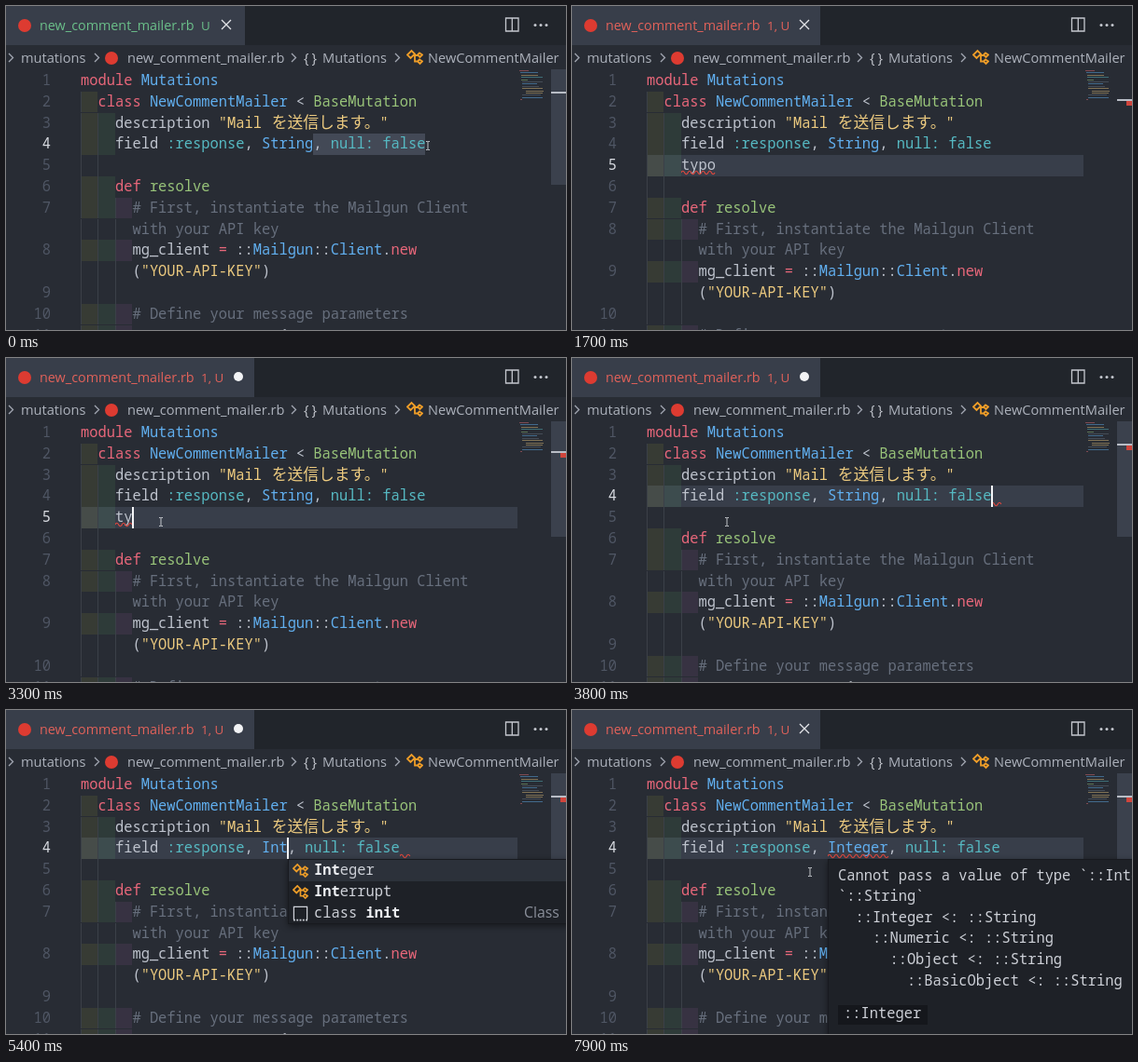
These frames come from a looping animation (600x348 px, 8 s). An HTML page:

```html
<!DOCTYPE html>
<html lang="en">
<head>
<meta charset="utf-8">
<title>Editor session</title>
<style>
  html, body { margin: 0; width: 100%; height: 100%; overflow: hidden; background: #282c34; }
  #stage { position: relative; width: 600px; height: 348px; overflow: hidden; background: #282c34; color: #bec3cd; }
  #stage div, #stage svg { position: absolute; }
  .ui { font: 14.6px/20px "Open Sans", sans-serif; white-space: pre; }
  .mono { font: 15.4px/22.8px "Noto Sans Mono", monospace; white-space: pre; font-variant-ligatures: none; }
  .bar { left: 0; top: 0; width: 600px; height: 42px; background: #21252b; }
  #tab { left: 0; top: 0; height: 42px; width: 256px; background: #383e4a; color: #6bc08a; font-size: 14.35px; }
  #tab.err { width: 266px; color: #e2625a; }
  #badge { left: 209px; top: 11px; font-size: 13.4px; }
  #close { left: 228px; top: 12px; }
  .err #close { left: 241px; }
  .gem { width: 14px; height: 14px; border-radius: 50%; background: #dd3b31; }
  .crumb { top: 45px; color: #adb2bc; }
  .no { left: 0; width: 48px; text-align: right; color: #4f5664; }
  .no.on { color: #d7dae0; }
  .r { color: #e8677a; } .b { color: #61afef; } .g { color: #98c379; }
  .y { color: #ecca7f; } .c { color: #56b9c2; } .m { color: #676f7d; }
  .j { color: #ecca7f; margin-left: 1.5px; font: 16.8px/0 "Noto Sans CJK JP", "Noto Sans CJK", sans-serif; }
  .w { font-weight: 700; color: #eceef2; }
  .pop { background: #1e2127; border: 1px solid #181a1f; box-sizing: border-box; box-shadow: 0 2px 7px #0007; overflow: hidden; color: #cdd0d7; }
  .line { fill: none; stroke: #c5c8cf; stroke-width: 1.3; }
</style>
</head>
<body>
<div id="stage">
  <svg width="0" height="0">
    <symbol id="class" viewBox="0 0 18 18"><path d="M1 6.500 5.500 2 9 5.500 4.500 10ZM7.500 7H12M9 7v6.500h3M12 6.500l2-2 3 2-2.500 2.500ZM12 13.500l2-2 3 2-2.500 2.500Z" fill="none" stroke="#ee9d28" stroke-width="1.8"/></symbol>
    <symbol id="cube" viewBox="0 0 18 18"><path d="M9 1.500 15.500 4.500V12.500L9 16.500 2.500 12.500V4.500ZM2.500 4.500 9 8l6.500-3.500M9 8v8.500" fill="none" stroke="#b094dc" stroke-width="1.5"/></symbol>
    <symbol id="snip" viewBox="0 0 18 18"><path d="M1.500 16V1.500H16.500V16" fill="none" stroke="#d0d3da" stroke-width="1.3"/><path d="M1 16.500H17" stroke="#d0d3da" stroke-width="2" stroke-dasharray="2 1.500"/></symbol>
  </svg>
  <div class="bar"></div>
  <div id="tab" class="ui">
    <div class="gem" style="left:13px;top:14px"></div>
    <div style="left:36px;top:11px">new_comment_mailer.rb</div>
    <div id="badge">U</div>
    <svg id="close" width="16" height="16"><path id="cross" d="M3 3 13 13M13 3 3 13" class="line" style="stroke:#e4e6ea"/><circle id="dot" cx="8" cy="8" r="5" fill="#f2f3f5"/></svg>
  </div>
  <svg width="60" height="42" style="left:530px;top:0"><path class="line" d="M5.500 13h13.500v14H5.500ZM12.300 13v14"/><g fill="#c5c8cf"><circle cx="37" cy="20.500" r="1.5"/><circle cx="43" cy="20.500" r="1.5"/><circle cx="49" cy="20.500" r="1.5"/></g></svg>
  <svg width="600" height="68" style="left:0;top:0"><path class="line" d="M3 51l4.500 4.500-4.500 4.500M95 51l4.500 4.500-4.500 4.500M306 51l4.500 4.500-4.500 4.500M417 51l4.500 4.500-4.500 4.500" style="stroke:#a3a8b3"/></svg>
  <div class="ui crumb" style="left:16px">mutations</div>
  <div class="gem" style="left:106px;top:49px"></div>
  <div class="ui crumb" style="left:130px">new_comment_mailer.rb</div>
  <div class="ui crumb" style="left:319px;letter-spacing:3px;color:#c5c8cf">{}</div>
  <div class="ui crumb" style="left:339px">Mutations</div>
  <svg width="18" height="18" style="left:429px;top:46px"><use href="#class"/></svg>
  <div class="ui crumb" style="left:452px">NewCommentMailer</div>
  <div id="code" class="mono"></div>
  <div id="map"></div>
  <div id="slider" style="left:584px;top:68px;width:16px;height:124px;background:#4e566680"></div>
  <div id="ruler"></div>
  <div id="caret" style="width:2px;height:22.8px;background:#f4f5f7"></div>
  <div id="popup" class="mono"></div>
  <svg id="mouse" width="8" height="12"><path d="M2 1.500H3.500L4 2 4.500 1.500H6M4 2V10M2 10.500H3.500L4 10 4.500 10.500H6" fill="none" stroke="#d4d7dc" stroke-width=".9"/></svg>
</div>
<script>
const $ = id => document.getElementById(id);
const LOOP = 8000, CW = 9.23, RH = 22.8, X0 = 80, Y0 = 68.9;
const colX = c => X0 + c * CW, rowY = r => Y0 + r * RH;

// {x:text} wraps text in a span of class x
const mark = s => s.replace(/&/g, '&amp;').replace(/</g, '&lt;')
  .replace(/\{(\w):(.*?)\}/g, '<span class="$1">$2</span>');
const div = (x, y, w, h, bg) =>
  `<div style="left:${x}px;top:${y}px;width:${w}px;height:${h}px;background:${bg}"></div>`;
const text = (x, y, s, cls = '') => `<div class="${cls}" style="left:${x}px;top:${y}px">${mark(s)}</div>`;
const icon = (x, y, id) => `<svg width="17" height="17" style="left:${x}px;top:${y}px"><use href="#${id}"/></svg>`;

const TINTS = ['#ffff4012', '#7fff7f12', '#ff7fff12'];

// [text, indent guides, is a wrapped continuation]
const docRows = s => [
  ['{r:module} {b:Mutations}', 0],
  ['  {r:class} {b:NewCommentMailer} < {g:BaseMutation}', 1],
  ['    description {y:"Mail }{j:を送信します。}{y:"}', 2],
  [`    field {c::response}, {b:${s.type}}, {c:null:} {c:false}`, 2],
  ...(s.line === null ? [] : [['    ' + s.line, 2]]),
  ['', 2],
  ['    {r:def} {g:resolve}', 2],
  ['      {m:# First, instantiate the Mailgun Client}', 3],
  ['      {m:with your API key}', 3, true],
  ['      mg_client {r:=} ::{b:Mailgun}::{b:Client}.{r:new}', 3],
  ['      ({y:"YOUR-API-KEY"})', 3, true],
  ['', 3],
  ['      {m:# Define your message parameters}', 3],
  ['      message_params {r:=} {', 3]
];

const TYPE_COL = 21;
const eol = s => TYPE_COL + s.type.length + 13;
const activeRow = s => s.line === null ? 3 : 4;

function squiggle(row, col, chars) {
  const n = Math.max(2, Math.round(chars * CW / 3.6));
  return `<svg width="90" height="6" style="left:${colX(col)}px;top:${rowY(row + 1) - 6.5}px">` +
    `<path d="M0 3q1.800 -3.500 3.600 0${'t3.600 0'.repeat(n - 1)}" fill="none" stroke="#e0483e" stroke-width="1.2"/></svg>`;
}

function codeHtml(s) {
  const active = activeRow(s);
  let html = s.sel ? div(colX(s.sel[0]), rowY(3), s.sel[1] * CW, RH, '#434956')
                   : div(X0, rowY(active), 468, RH, '#383e4a');
  let no = 0;
  docRows(s).forEach(([src, guides, wrapped], r) => {
    const y = rowY(r);
    const depth = wrapped ? 0 : src.match(/^ */)[0].length / 2;
    for (let i = 0; i < depth; i++) html += div(colX(2 * i), y, 2 * CW, RH, TINTS[i]);
    for (let i = 0; i < guides; i++) html += div(colX(2 * i), y, 1, RH, '#3b4048');
    if (!wrapped) html += text(0, y, String(++no), r === active ? 'no on' : 'no');
    html += text(X0, y, src);
  });
  if (s.squig === 'line') html += s.line === null ? squiggle(3, eol(s), 1) : squiggle(4, 4, s.line.length);
  if (s.squig === 'type') html += squiggle(3, TYPE_COL, s.type.length);
  return html;
}

// Overview ruler: cursor line and error mark
function rulerHtml(s) {
  const y = 92 + (activeRow(s) - 3) * 7.5;
  return div(584, y, 16, 2, '#b9bdc6') + (s.err ? div(594, y + 2, 6, 5, '#d0453c') : '');
}

const METHODS = [
  'try: (?un{w:typ}ed, *untyped) { (untyped) -> untyped',
  'try!: (?un{w:typ}ed, *untyped) { (untyped) -> untyped',
  'to_query: (un{w:typ}ed) -> ::String',
  'to_param: () -> un{w:typ}ed',
  'throw: (::Object, ?un{w:typ}ed) -> bot',
  'to_enum: (::Symbol, *un{w:typ}ed) ?{ (*untyped) -> untyped',
  'thread_cattr_reader: (*un{w:typ}ed, ?instance_reader: untyped'
].map(m => ['cube', 'def ' + m]);
const CLASSES = [['class', '{w:Int}eger'], ['class', '{w:Int}errupt'], ['snip', 'class {w:init}']];

const panel = (x, y, h, body) =>
  `<div class="pop" style="left:${x}px;top:${y}px;width:${610 - x}px;height:${h}px">${body}</div>`;
const list = (x, y, items) => panel(x, y, items.length * RH + 2,
  div(0, 0, 600, RH, '#2c313a') +
  items.map(([id, s], i) => icon(4, i * RH + 3, id) + text(27, i * RH, s)).join(''));

const POPUPS = {
  '': () => '',
  methods: () => list(144, 183, METHODS),
  classes: () => list(302, 160, CLASSES) +
    '<div class="ui" style="left:555px;top:207px;font-size:15.8px;color:#8b909b">Class</div>',
  hover: () => panel(274, 160, 200, [
    'Cannot pass a value of type `::Integer` as an argument',
    '`::String`',
    '  ::Integer <: ::String',
    '    ::Numeric <: ::String',
    '      ::Object <: ::String',
    '        ::BasicObject <: ::String (expected)'
  ].map((s, i) => text(10, 5.5 + i * 22.6, s)).join('') +
    div(10, 156, 96, 21, '#15171c') + text(16, 154, '::Integer'))
};

// Each step changes part of the state; blink restarts the caret
const STEPS = [
  [0, { type: 'String', line: null, sel: [27, 13], at: '', dirty: false, err: false, squig: '', pop: '', blink: 0 }],
  [100, { sel: null, at: 'eol', blink: 100 }],
  [300, { line: '', at: 'line', dirty: true, blink: 300 }],
  [500, { line: 't', blink: 500 }],
  [600, { line: 'ty', blink: 600 }],
  [700, { line: 'typ', blink: 700 }],
  [800, { pop: 'methods' }],
  [1000, { line: 'typo', pop: '', blink: 1000 }],
  [1200, { dirty: false }],
  [1500, { err: true, squig: 'line' }],
  [3200, { line: 'typ', dirty: true, blink: 3200 }],
  [3300, { line: 'ty', blink: 3300 }],
  [3400, { line: 't', blink: 3400 }],
  [3500, { line: '', blink: 3500 }],
  [3700, { line: null, at: 'eol', blink: 3700 }],
  [4400, { sel: [TYPE_COL, 6], at: '' }],
  [4900, { type: 'I', sel: null, at: 'type', blink: 4900 }],
  [5100, { type: 'In', blink: 5100 }],
  [5300, { type: 'Int', pop: 'classes', blink: 5300 }],
  [5600, { type: 'Integer', pop: '', blink: 5600 }],
  [7000, { dirty: false, squig: '', blink: 7000 }],
  [7200, { squig: 'type' }],
  [7500, { pop: 'hover' }]
];
let acc = {};
const STATES = STEPS.map(([t, change]) => ({ t, s: acc = { ...acc, ...change } }));

// Pointer runs: lists of [time, x, y]
const RUNS = [
  [[0, 452, 150], [1000, 452, 150]],
  [[2150, 452, 150], [2500, 171, 186], [2900, 171, 186], [3100, 166, 176], [3900, 166, 176], [4300, 300, 150], [4900, 300, 150]],
  [[6100, 300, 168], [6900, 300, 168], [7150, 300, 150], [7650, 300, 150], [7900, 255, 174], [LOOP, 255, 174]]
];

function pointerAt(t) {
  const run = RUNS.find(r => t >= r[0][0] && t < r[r.length - 1][0]);
  if (!run) return null;
  const i = run.findIndex(p => p[0] > t);
  const [a, ax, ay] = run[i - 1], [b, bx, by] = run[i];
  const k = (t - a) / (b - a), e = k * k * (3 - 2 * k);
  return [ax + (bx - ax) * e, ay + (by - ay) * e];
}

function drawState(s) {
  $('code').innerHTML = codeHtml(s);
  $('ruler').innerHTML = rulerHtml(s);
  $('popup').innerHTML = POPUPS[s.pop]();
  $('tab').classList.toggle('err', s.err);
  $('badge').textContent = s.err ? '1, U' : 'U';
  $('cross').style.display = s.dirty ? 'none' : '';
  $('dot').style.display = s.dirty ? '' : 'none';
  const col = s.at === 'line' ? 4 + s.line.length : s.at === 'type' ? TYPE_COL + s.type.length : eol(s);
  $('caret').style.left = colX(col) - .5 + 'px';
  $('caret').style.top = rowY(activeRow(s)) + 'px';
}

const MAP = ['0r12', '1b24', '2y22', '2c29', '2g9', '3m28', '3b20', '3m23', '3y28', '7y24', '7y22', '3m25', '3b27', '1r3'];
const HUES = { r: '#e06c75', b: '#61afef', y: '#e5c07b', c: '#56b6c2', g: '#98c379', m: '#676f7d' };
$('map').innerHTML = MAP.map((m, i) =>
  div(550 + +m[0], 69 + i * 2.4, m.slice(2) * .8, 1, HUES[m[1]] + '77')).join('');

let shown = null;
function frame() {
  const t = performance.now() % LOOP;
  const { s } = STATES.filter(x => x.t <= t).pop();
  if (s !== shown) drawState(shown = s);
  $('caret').style.visibility = s.at && (t - s.blink) % 1000 < 500 ? 'visible' : 'hidden';
  const p = pointerAt(t);
  $('mouse').style.visibility = p ? 'visible' : 'hidden';
  $('slider').style.visibility = t > 1200 && t < 2150 ? 'hidden' : 'visible';
  if (p) $('mouse').style.transform = `translate(${p[0] - 4}px,${p[1] - 6}px)`;
  requestAnimationFrame(frame);
}
$('mouse').style.left = $('mouse').style.top = 0;
frame();
</script>
</body>
</html>
```
